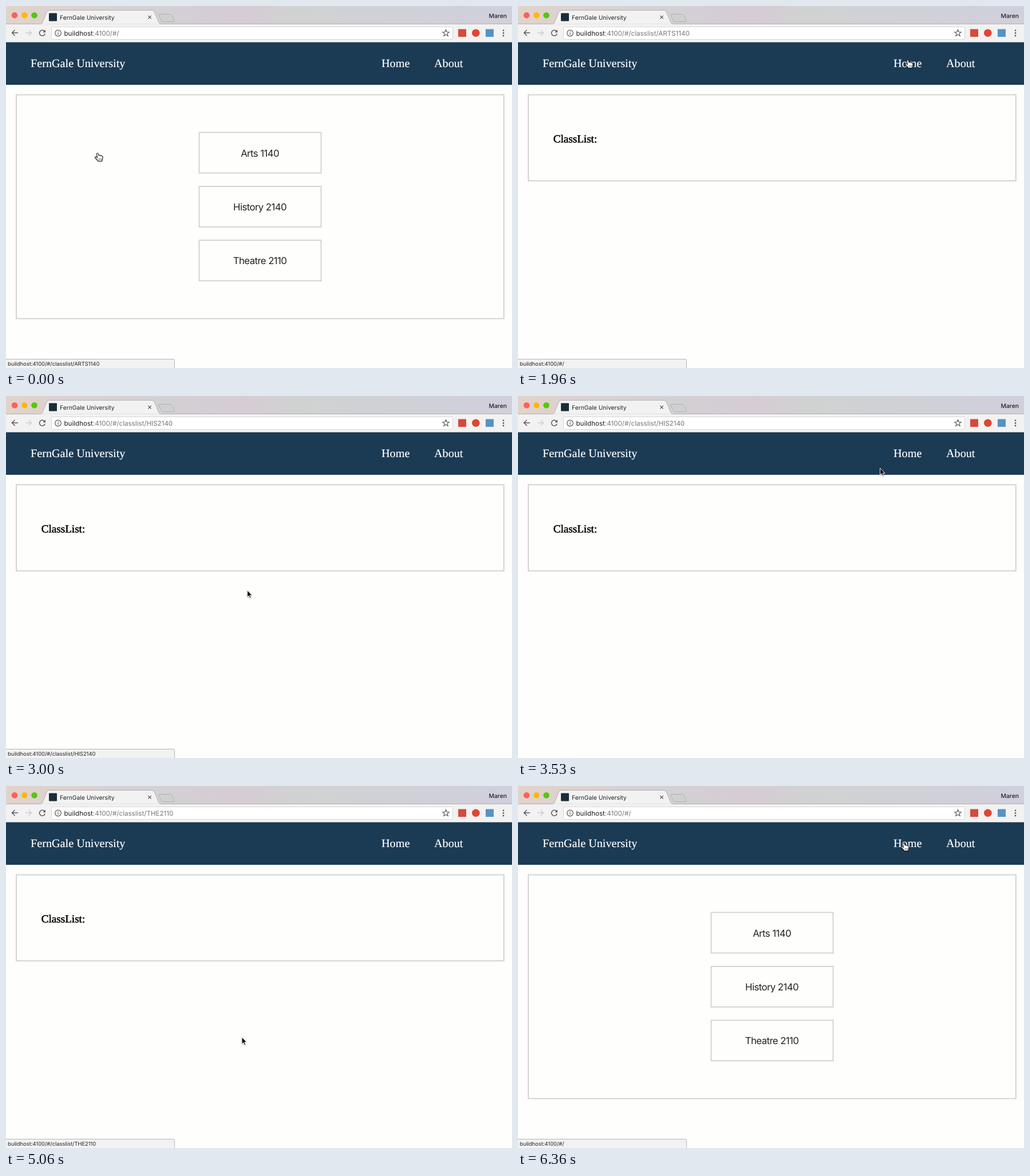
Recreate the animation shown at these times as an HTML page. Size 884 by 634 pixels, loop 7200 ms.

```html
<!DOCTYPE html>
<html lang="en">
<head>
<meta charset="utf-8">
<title>Class list</title>
<style>
  html, body { margin: 0; width: 100%; height: 100%; overflow: hidden; background: #fefefd; }
  svg { display: block; width: 100vw; height: 100vh; }
  text { font-family: Inter, Roboto, sans-serif; text-rendering: geometricPrecision; white-space: pre; }
  .serif { font-family: "Liberation Serif", "Noto Serif", serif; font-size: 20.2px; fill: #fff; stroke: #fff; stroke-width: .2px; }
  .heading { font-size: 19.1px; fill: #000; stroke: #000; stroke-width: .55px; }
  .url { font-size: 11.6px; fill: #757575; }
  .url .host { fill: #1c1c1c; }
  .course { font-size: 16.8px; letter-spacing: -.6px; text-anchor: middle; fill: #222; }
  .frame { fill: none; stroke: #d2d2d2; stroke-width: 1.9; }
  .icon { fill: none; stroke: #5b5b5b; stroke-width: 1.5; }
  .icon.thin { stroke-width: 1.2; }
  .icon.off { stroke: #cfcfcf; }
</style>
</head>
<body>
<svg viewBox="0 0 884 634" preserveAspectRatio="none">
  <defs>
    <linearGradient id="titlebar">
      <stop offset="0" stop-color="#e2d2cc"/>
      <stop offset=".3" stop-color="#d2d1d4"/>
      <stop offset=".46" stop-color="#d6ccd4"/>
      <stop offset=".58" stop-color="#d0d2d2"/>
      <stop offset="1" stop-color="#d0cfdc"/>
    </linearGradient>
    <filter id="shadow" x="-50%" y="-50%" width="200%" height="200%">
      <feDropShadow dx="0" dy="1" stdDeviation=".8" flood-opacity=".35"/>
    </filter>
  </defs>

  <rect width="884" height="634" fill="#fefefd"/>

  <!-- Title bar and tabs -->
  <rect width="884" height="32" fill="url(#titlebar)"/>
  <circle cx="15" cy="16.3" r="5.3" fill="#fc605b"/>
  <circle cx="32.3" cy="16.3" r="5.3" fill="#fdb90f"/>
  <circle cx="49.5" cy="16.3" r="5.3" fill="#52c90d"/>
  <path d="M0 31.5H60Q63 31 64 28L71 11Q72 7.500 75 7.500H255Q258 7.500 259.500 11L266.500 28Q268 31.500 271 31.500H884" fill="#f2f2f2" stroke="#b3b1b3"/>
  <path d="M268 14.500H286Q289 14.500 290 17L294 25Q295 27.500 292 27.500H275Q272 27.500 271 25L267 16.500Q266 14.500 268 14.500Z" fill="#d0d0d1" stroke="#b1b0b2"/>
  <rect x="75" y="12.500" width="14" height="14" rx="1" fill="#1c2d38"/>
  <text x="94" y="23.500" font-size="10.3" fill="#222">FernGale University</text>
  <path class="icon thin" d="M248.300 17L253.700 22.400M253.700 17L248.300 22.400"/>
  <text x="875" y="20.800" font-size="10.4" font-weight="500" text-anchor="end" fill="#222">Maren</text>

  <!-- Toolbar -->
  <rect y="32" width="884" height="32" fill="#f2f2f2"/>
  <path class="icon" d="M21 47H10.500M15.500 42L10.500 47L15.500 52"/>
  <path class="icon off" d="M34 47H44.500M39.500 42L44.500 47L39.500 52"/>
  <path class="icon" d="M67.500 44.200A5 5 0 1 0 68.300 48.500"/>
  <path d="M69 41.500V46.200H64.300Z" fill="#5b5b5b"/>
  <rect x="79.500" y="36.500" width="701" height="22" rx="2" fill="#fff" stroke="#d6d6d6"/>
  <circle class="icon thin" cx="91" cy="47.500" r="5.300"/>
  <path class="icon thin" d="M91 46.500V50.500M91 44V45.400"/>
  <text class="url" x="101.500" y="51.700"><tspan class="host">buildhost</tspan><tspan id="address"></tspan></text>
  <path class="icon thin" d="M768.500 41.500L770 45.500L774.200 45.700L770.900 48.300L772.100 52.400L768.500 50L764.900 52.400L766.100 48.300L762.800 45.700L767 45.500Z"/>
  <rect x="790" y="40.500" width="14" height="13.500" fill="#d34b3b"/>
  <circle cx="820.800" cy="47.300" r="6.800" fill="#de4632"/>
  <rect x="838" y="40.500" width="14" height="13.500" fill="#5793c1"/>
  <path d="M869 42.800V52.500" stroke="#5b5b5b" stroke-width="2.800" stroke-linecap="round" stroke-dasharray="0 4.600"/>

  <!-- Page -->
  <rect y="63.500" width="884" height="74.500" fill="#1b3a54"/>
  <text class="serif" x="43" y="107">FernGale University</text>
  <text class="serif" x="656" y="107">Home</text>
  <text class="serif" x="748" y="107">About</text>
  <g id="home">
    <rect class="frame" x="18" y="155.500" width="851.800" height="392"/>
    <g id="courses"></g>
  </g>
  <g id="list">
    <rect class="frame" x="18" y="155.500" width="851.800" height="150.800"/>
    <text class="serif heading" x="61.800" y="239">ClassList:</text>
  </g>

  <!-- Link preview -->
  <g id="preview">
    <path d="M-1 618.500H292Q294.500 618.500 294.500 621V634.500H-1Z" fill="#f2f2f3" stroke="#b4b4b6"/>
    <text id="link" x="3" y="629.700" font-size="9.400" fill="#222"></text>
  </g>

  <g id="cursor" filter="url(#shadow)">
    <path id="arrow" d="M0 0V12L2.800 9.400L4.600 13.600L6.600 12.700L4.800 8.600H8.600Z" fill="#111" stroke="#fff" stroke-width=".9"/>
    <g id="hand" stroke="#2b2b2b" stroke-width="1.100" stroke-linejoin="round">
      <path d="M-1.700 1C-1.700 -.6 .9 -.8 1.300 .9L2.100 4C3 3 4.500 3.200 4.800 4.300C5.600 3.500 7 3.800 7.200 5C8.200 4.500 9 5 8.900 6.300L8.500 10L7.300 13.500H.8C0 11.500 -2 10 -3.900 8C-5.100 6.500 -3.600 5.300 -2.200 6.300L-.4 7.600Z" fill="#fff"/>
      <path d="M2.200 9V11.500M4.300 9V11.500M6.300 9V11.500" fill="none" stroke-width=".8"/>
    </g>
  </g>
</svg>
<script>
  const LOOP = 7200;
  const PREVIEW_LAG = 150;
  const HOME = ":4100/#/";
  const ROW = { top: 221.5, pitch: 94.4, height: 71 };
  const courses = ["Arts 1140", "History 2140", "Theatre 2110"];

  const $ = id => document.getElementById(id);
  const show = (id, on) => $(id).style.display = on ? "" : "none";

  // Course pages use the first letters and the number: four letters for a short name, else three
  const urls = courses.map(course => {
    const [name, number] = course.split(" ");
    return `${HOME}classlist/${name.slice(0, name.length > 4 ? 3 : 4).toUpperCase()}${number}`;
  });

  $("courses").innerHTML = courses.map((course, i) => {
    const y = ROW.top + i * ROW.pitch;
    return `<rect class="frame" x="337.5" y="${y}" width="213" height="${ROW.height}"/>
      <text class="course" x="443.5" y="${y + 42}">${course}</text>`;
  }).join("");

  // The pointer travels to each stop, then clicks the link it finds there
  const origin = [160, 258];
  const stops = [
    { start: 100, end: 430, click: 830, at: [388, 262], url: urls[0] },
    { start: 960, end: 1460, click: 2060, at: [681, 95], url: HOME },
    { start: 2060, end: 2460, click: 2730, at: [421, 341], url: urls[1] },
    { start: 3000, end: 3780, click: 4230, at: [668, 105], url: HOME },
    { start: 4300, end: 4800, click: 5060, at: [412, 440], url: urls[2] },
    { start: 5240, end: 6000, click: 6330, at: [674, 100], url: HOME },
  ];

  const stopIndex = t => Math.max(0, stops.findLastIndex(stop => stop.start <= t));
  const pageAt = t => stops.findLast(stop => stop.click <= t)?.url ?? HOME;

  function pointerAt(t) {
    const i = stopIndex(t);
    const { start, end, at } = stops[i];
    const from = i ? stops[i - 1].at : origin;
    const left = 1 - Math.min(1, Math.max(0, (t - start) / (end - start)));
    // Slows into the stop, a little sooner vertically, so the path bows
    return [1.7, 2.1].map((power, k) => at[k] + (from[k] - at[k]) * left ** power);
  }

  function linkUnder([x, y], page) {
    if (x > 655 && x < 706 && y > 84 && y < 116) return HOME;
    const offset = y - ROW.top;
    const inRow = offset >= 0 && offset % ROW.pitch < ROW.height;
    return page === HOME && inRow ? urls[Math.floor(offset / ROW.pitch)] : undefined;
  }

  // A resting pointer keeps its link until it moves again, even when the page changes
  const previewAt = t => linkUnder(pointerAt(t), pageAt(Math.min(t, stops[stopIndex(t)].end)));

  function draw(t) {
    const page = pageAt(t);
    const pointer = pointerAt(t);
    const onLink = Boolean(linkUnder(pointer, page));
    const preview = previewAt(t) ?? previewAt(t - PREVIEW_LAG);
    show("home", page === HOME);
    show("list", page !== HOME);
    show("hand", onLink);
    show("arrow", !onLink);
    show("preview", preview);
    $("address").textContent = page;
    $("link").textContent = `buildhost${preview}`;
    $("cursor").setAttribute("transform", `translate(${pointer})`);
  }

  const begin = performance.now();
  function tick() {
    draw((performance.now() - begin) % LOOP);
    requestAnimationFrame(tick);
  }
  tick();
</script>
</body>
</html>
```
